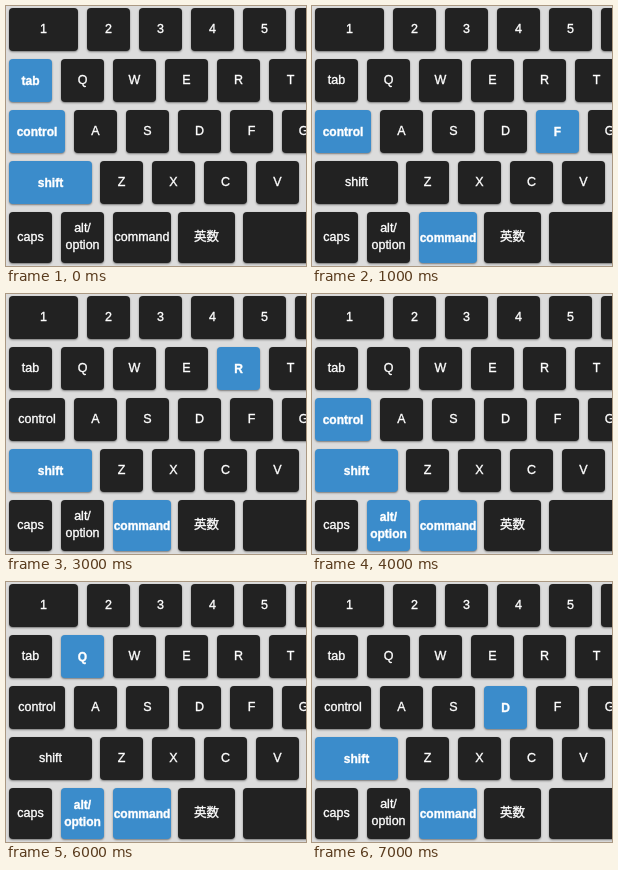
An HTML page with a canvas that plays this animation: 300x260 px, repeating every 8 s.

```html
<!DOCTYPE html>
<html lang="en">
<head>
<meta charset="utf-8">
<title>Keyboard shortcuts</title>
<style>
html, body { margin: 0; width: 100%; height: 100%; overflow: hidden; background: #dcdcdc; }
canvas { display: block; }
</style>
</head>
<body>
<canvas id="stage" width="300" height="260"></canvas>
<script>
const ctx = document.getElementById('stage').getContext('2d');
const STEP = 1000;
const PITCH = 52;
const KEY = 43;

// Keys held down during each step of the loop.
const chords = [
  ['tab', 'control', 'shift'],
  ['control', 'command', 'F'],
  ['alt/ option', 'command', 'E'],
  ['shift', 'command', 'R'],
  ['control', 'shift', 'alt/ option', 'command'],
  ['control', 'shift', 'W'],
  ['alt/ option', 'command', 'Q'],
  ['shift', 'command', 'D']
];

const keys = [];
const addKey = (label, x, y, w = KEY, h = KEY) => keys.push({ label, x, y, w, h });
const addRow = (first, width, letters, start, y) => {
  addKey(first, 3, y, width);
  [...letters].forEach((letter, i) => addKey(letter, start + i * PITCH, y));
};

addRow('1', 69, '23456', 81, 2);
addRow('tab', KEY, 'QWERT', 55, 53);
addRow('control', 56, 'ASDFG', 68, 104);
addRow('shift', 83, 'ZXCV', 94, 155);
addKey('caps', 3, 206, KEY, 51);
addKey('alt/ option', 55, 206, KEY, 51);
addKey('command', 107, 206, 58, 51);
addKey('英数', 172, 206, 57, 51);
addKey('', 237, 206, 90, 51);

function drawKey({ label, x, y, w, h }, pressed) {
  ctx.save();
  ctx.shadowColor = 'rgba(0,0,0,0.45)';
  ctx.shadowBlur = 2;
  ctx.shadowOffsetY = 1;
  ctx.fillStyle = pressed ? '#3b8ccb' : '#222';
  ctx.beginPath();
  ctx.roundRect(x, y, w, h, 4);
  ctx.fill();
  ctx.restore();

  ctx.font = (pressed ? 'bold 12px' : '12.5px') +
    ' "Liberation Sans", "Noto Sans CJK JP", "Noto Sans CJK", sans-serif';
  ctx.fillStyle = ctx.strokeStyle = '#fff';
  ctx.lineWidth = 0.35;
  const lines = label.split(' ');
  const baseline = y + (h > KEY ? 29 : 25) + (pressed ? 1 : 0) - (lines.length - 1) * 9;
  lines.forEach((line, i) => {
    ctx.fillText(line, x + w / 2, baseline + i * 17);
    ctx.strokeText(line, x + w / 2, baseline + i * 17);
  });
}

function draw(time) {
  const chord = chords[Math.floor(time / STEP) % chords.length];
  ctx.fillStyle = '#dcdcdc';
  ctx.fillRect(0, 0, 300, 260);
  ctx.textAlign = 'center';
  for (const key of keys) drawKey(key, chord.includes(key.label));
}

const start = performance.now();
function tick() {
  draw(performance.now() - start);
  requestAnimationFrame(tick);
}
tick();
</script>
</body>
</html>
```
